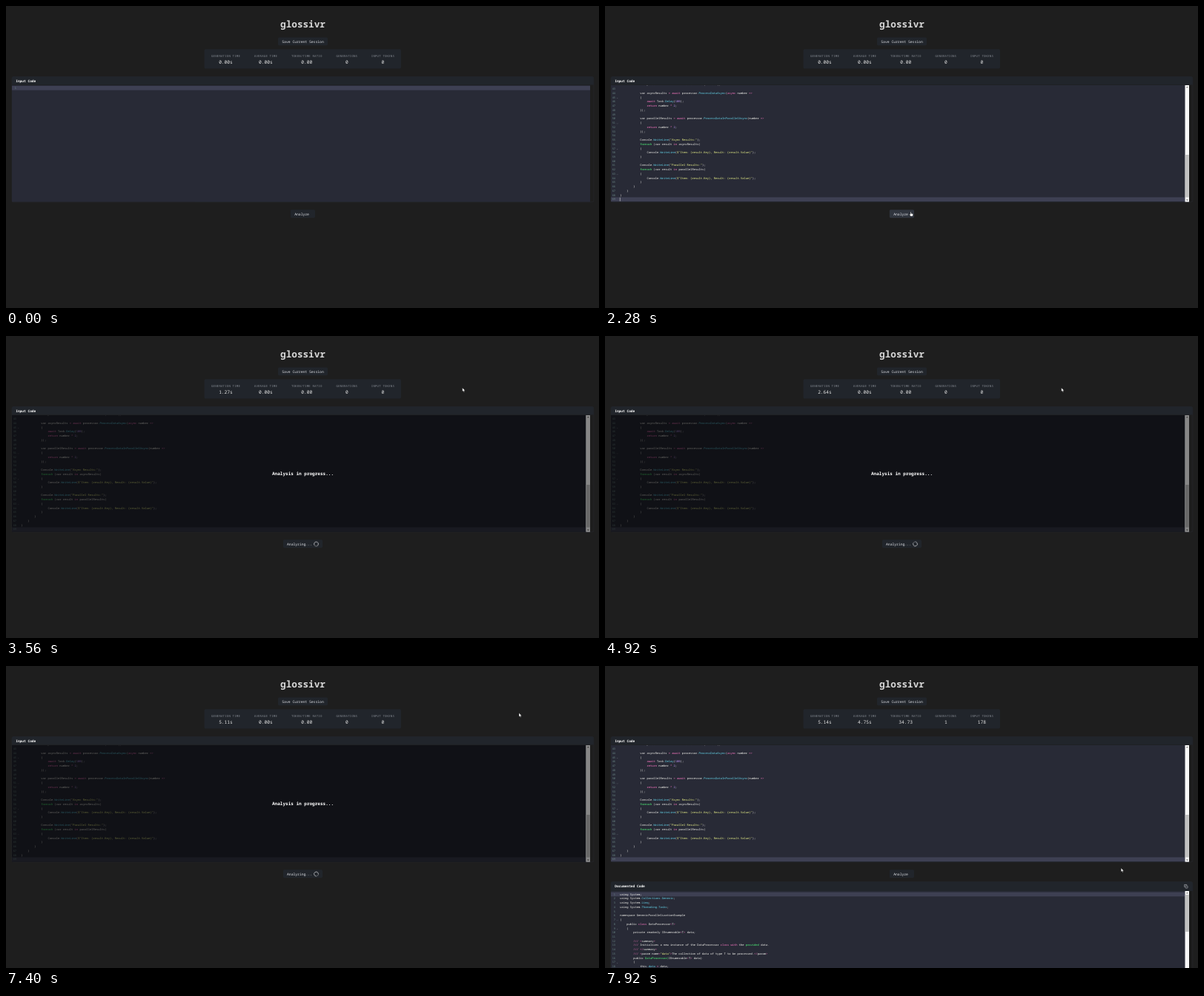
An HTML page that plays this animation: 800x408 px, repeating every 8000 ms.

```html
<!DOCTYPE html>
<html lang="en">
<head>
<meta charset="utf-8">
<title>glossivr</title>
<style>
html, body { margin: 0; width: 100%; height: 100%; overflow: hidden; background: #1e1e1e; }
svg { display: block; width: 100vw; height: 100vh; }
text { font-family: "Noto Sans Mono", "DejaVu Sans Mono", monospace; white-space: pre; text-rendering: geometricPrecision; }
.mid { text-anchor: middle; }
.code { font-size: 3.77px; font-weight: 500; fill: #f8f8f2; }
.num { font-size: 3.6px; fill: #6d8a88; text-anchor: end; }
.head { font-size: 4.52px; font-weight: 700; fill: #fff; }
.btn { font-size: 4.72px; font-weight: 500; fill: #e4e6ea; }
.label { font-size: 4px; letter-spacing: .2px; fill: #858a92; }
.value { font-size: 6.25px; font-weight: 500; fill: #e6e6e6; }
</style>
</head>
<body>
<svg id="stage" viewBox="0 0 800 408">
  <defs>
    <clipPath id="inClip"><rect x="8" y="107" width="780" height="157.5"/></clipPath>
    <clipPath id="outClip"><rect x="8" y="304" width="780" height="104"/></clipPath>
  </defs>
  <rect width="800" height="408" fill="#1e1e1e"/>
  <text class="mid" x="400.5" y="29" font-size="12.7" font-weight="700" fill="#d6d6d6">glossivr</text>
  <rect x="367" y="42.5" width="67" height="10.7" rx="1.6" fill="#21252b"/>
  <text class="btn mid" x="400.5" y="49.5">Save Current Session</text>
  <rect x="267.5" y="58.2" width="265.5" height="26.4" rx="2.2" fill="#21252b"/>
  <g id="stats"></g>

  <rect x="8" y="95.5" width="784.8" height="169.3" rx="2" fill="#1e1e1e" stroke="#292d33" stroke-width=".5"/>
  <path d="M8 106.5V97.5q0-2 2-2H790.8q2 0 2 2V106.5z" fill="#21252b"/>
  <text class="head" x="13.2" y="102.6">Input Code</text>
  <rect x="8" y="107" width="780" height="157.6" fill="#282a36"/>
  <g id="blank">
    <rect x="8" y="108" width="780" height="5.7" fill="#44475a" opacity=".8"/>
    <text class="num" x="14" y="112.2">1</text>
  </g>
  <g id="pasted">
    <g id="inCode" clip-path="url(#inClip)"></g>
    <rect id="dim" x="8" y="107" width="774.5" height="157.6" opacity=".6"/>
    <g id="inBar"></g>
  </g>
  <rect id="caret" x="19.9" width=".5" height="5" fill="#f8f8f2"/>
  <text id="busy" class="mid" x="400.5" y="188" font-size="6.02" font-weight="700" fill="#fff">Analysis in progress...</text>

  <rect id="btn" y="275.2" height="11" rx="1.6"/>
  <text id="btnText" class="btn" y="282.5"></text>
  <g id="spin" fill="none" stroke-width=".8">
    <circle r="2.9" stroke="#b4b7bb"/>
    <path d="M-2.05-2.05A2.9 2.9 0 0 1 2.05-2.05" stroke="#3a3e44"/>
  </g>

  <g id="result">
    <rect x="8" y="291.5" width="784.8" height="130" rx="2" fill="#1c1c1c" stroke="#292d33" stroke-width=".5"/>
    <path d="M8 304V293.5q0-2 2-2H790.8q2 0 2 2V304z" fill="#21252b"/>
    <text class="head" x="13.2" y="299.4">Documented Code</text>
    <g fill="none" stroke="#cfd2d6" stroke-width=".55">
      <rect x="783" y="297" width="3" height="3" rx=".5"/>
      <path d="M782.3 298.4h-.6v-3h3v.8"/>
    </g>
    <g id="output">
      <rect x="8" y="304" width="780" height="104" fill="#282a36"/>
      <g id="outCode" clip-path="url(#outClip)"></g>
      <g id="outBar"></g>
    </g>
  </g>

  <g id="cursor">
    <path id="arrow" d="M0 0V5L1.2 4L2 5.8L2.9 5.4L2.1 3.7H3.7z" fill="#fff" stroke="#000" stroke-width=".3"/>
    <path id="beam" d="M-.9-2.8H.9M0-2.8V2.8M-.9 2.8H.9" fill="none" stroke="#d8d8d8" stroke-width=".5"/>
    <path id="hand" d="M0 0h.9v2.2l2.6.5v2l-.7 1.4H.2L-1.4 3.6l.6-.5.8.6z" fill="#fff" stroke="#000" stroke-width=".3"/>
    <g id="stop" transform="translate(2 1.4)" fill="none">
      <circle r="1.9" stroke="#fff" stroke-width="1.2"/>
      <path d="M-1.3-1.3L1.3 1.3" stroke="#fff" stroke-width="1.1"/>
      <circle r="1.9" stroke="#c4476f" stroke-width=".7"/>
      <path d="M-1.3-1.3L1.3 1.3" stroke="#c4476f" stroke-width=".7"/>
    </g>
  </g>
</svg>
<script>
const $ = id => document.getElementById(id);
const show = (id, on) => $(id).setAttribute('display', on ? 'inline' : 'none');
const attrs = (node, map) => { for (const k in map) node.setAttribute(k, map[k]); return node; };
const add = (parent, tag, map, text) => {
  const node = attrs(document.createElementNS('http://www.w3.org/2000/svg', tag), map);
  if (text !== undefined) node.textContent = text;
  return parent.appendChild(node);
};

const LOOP = 8000, PITCH = 5.74, CHAR = 2.262;
const PASTE = 720, START = 2300, DONE = 7480, FILLED = 7600;

const inputLines = `            var processor = new DataProcessor<int>(numbers);

            var asyncResults = await processor.ProcessDataAsync(async number =>
            {
                await Task.Delay(100);
                return number * 2;
            });

            var parallelResults = await processor.ProcessDataInParallelAsync(number =>
            {
                return number * 2;
            });

            Console.WriteLine("Async Results:");
            foreach (var result in asyncResults)
            {
                Console.WriteLine($"Item: {result.Key}, Result: {result.Value}");
            }

            Console.WriteLine("Parallel Results:");
            foreach (var result in parallelResults)
            {
                Console.WriteLine($"Item: {result.Key}, Result: {result.Value}");
            }
        }
    }
}
`.split('\n');

const outputLines = `using System;
using System.Collections.Generic;
using System.Linq;
using System.Threading.Tasks;

namespace GenericParallelizationExample
{
    public class DataProcessor<T>
    {
        private readonly IEnumerable<T> data;

        /// <summary>
        /// Initializes a new instance of the DataProcessor class with the provided data.
        /// </summary>
        /// <param name="data">The collection of data of type T to be processed.</param>
        public DataProcessor(IEnumerable<T> data)
        {
            this.data = data;`.split('\n');

function colour(word) {
  if (/^\$?"/.test(word)) return '#f1fa8c';
  if (/^\.\w/.test(word)) return '#66d9ef';
  if (/^\d/.test(word)) return '#bd93f9';
  if (/^(await|async|return|in|class|with)$/.test(word) || /^[=<>*\/]+$/.test(word)) return '#ff79c6';
  if (/^(foreach|provided|DataProcessor\()$/.test(word)) return '#50fa7b';
  return '#f8f8f2';
}

function drawCode(group, lines, first, y, active) {
  add(group, 'rect', { x: 8, y: y + PITCH * (active - first) - 2.8, width: 774.5, height: 5.7, fill: '#44475a', opacity: .8 });
  lines.forEach((line, i) => {
    const mid = y + i * PITCH, code = line.trimStart();
    add(group, 'text', { class: 'num', x: 14, y: mid + 1.2 }, first + i);
    if (code === '{') add(group, 'path', { d: `M16 ${mid + .7}l.6.6.6-.6`, stroke: '#8b8f9c', 'stroke-width': .4, fill: 'none' });
    const text = add(group, 'text', { class: 'code', x: 20.2 + CHAR * (line.length - code.length), y: mid + 1.2 });
    const parts = code.match(/\$?"[^"]*"|\.\w+|DataProcessor\(|\w+|[=<>*\/]+|\s+|./g) || [];
    parts.forEach(p => add(text, 'tspan', { fill: colour(p) }, p));
  });
}

function drawBar(group, top, bottom, from, to) {
  add(group, 'rect', { x: 782.5, y: top, width: 5.5, height: bottom - top, fill: '#f8f8f8' });
  add(group, 'rect', { x: 782.8, y: from, width: 4.9, height: to - from, fill: '#c1c1c1' });
  add(group, 'path', { d: `M784.1 ${top + 3.2}l1.2-1.5 1.2 1.5z`, fill: '#444' });
  add(group, 'path', { d: `M784.1 ${bottom - 3.2}l1.2 1.5 1.2-1.5z`, fill: '#444' });
}

drawCode($('inCode'), inputLines, 42, 261.2 - 27 * PITCH, 69);
drawCode($('outCode'), outputLines, 1, 308.4, 1);
drawBar($('inBar'), 107, 264.6, 201, 258.5);
drawBar($('outBar'), 304, 416, 309, 359);
add($('inBar'), 'rect', { id: 'barDim', x: 782.5, y: 107, width: 5.5, height: 157.6, opacity: .46 });

const values = [
  ['GENERATION TIME', 296.5], ['AVERAGE TIME', 350.4], ['TOKEN/TIME RATIO', 405.7],
  ['GENERATIONS', 459.9], ['INPUT TOKENS', 508.4]
].map(([name, x]) => {
  add($('stats'), 'text', { class: 'label mid', x, y: 68.9 }, name);
  return add($('stats'), 'text', { class: 'value mid', x, y: 77.5 });
});

// Each key holds a time followed by the values at that time.
function track(keys, t) {
  const i = keys.findIndex(k => k[0] > t);
  if (i === 0) return keys[0].slice(1);
  if (i < 0) return keys[keys.length - 1].slice(1);
  const a = keys[i - 1], b = keys[i], p = (t - a[0]) / (b[0] - a[0]), e = p * p * (3 - 2 * p);
  return a.slice(1).map((v, n) => v + (b[n + 1] - v) * (b.length > 2 ? e : p));
}

const path = [
  [400, 158.7, 178.5], [1240, 158.7, 178.5], [1280, 292, 186.4], [1360, 329.5, 189.6],
  [1520, 329.5, 189.6], [2040, 408, 279], [2280, 412, 278], [2360, 412, 278],
  [3120, 615.7, 70], [6800, 615.7, 70], [7400, 692, 63.5], [7520, 707.7, 97.5],
  [7720, 696.6, 273.4], [7880, 696.6, 273.4], [7920, 696.2, 273]
];
const clock = [[2290, 0], [2320, .03], [4920, 2.64], [6400, 4.11], [7400, 5.11]];

function render(t) {
  const busy = t >= START && t < DONE, done = t >= DONE;
  const secs = done ? 5.14 : track(clock, t)[0];
  const texts = done ? ['4.75s', '34.73', '1', '178'] : ['0.00s', '0.00', '0', '0'];
  [secs.toFixed(2) + 's', ...texts].forEach((s, i) => { values[i].textContent = s; });

  show('blank', t < PASTE);
  show('pasted', t >= PASTE);
  show('dim', busy);
  show('barDim', busy);
  show('busy', busy);
  show('caret', t >= 480 && t < START);
  attrs($('caret'), { y: t < PASTE ? 108.3 : 258.7 });

  const [x, y] = track(path, t);
  const left = busy ? 374 : 383.8, right = busy ? 427 : 417;
  const over = x > left && x < right && y > 274 && y < 286;
  attrs($('btn'), { x: left, width: right - left, fill: over ? '#30353e' : '#21252b' });
  attrs($('btnText'), { x: busy ? 379 : 389.2 });
  $('btnText').textContent = busy ? 'Analyzing...' : 'Analyze';
  show('spin', busy);
  attrs($('spin'), { transform: `translate(418.5 281) rotate(${t * .36 % 360})` });

  show('result', done);
  show('output', t >= FILLED);

  show('cursor', t >= 400);
  attrs($('cursor'), { transform: `translate(${x} ${y})` });
  const beam = t < START && y < 265;
  show('beam', beam);
  show('hand', over && !busy);
  show('stop', over && busy);
  show('arrow', !beam && !over);
}

function frame(now) {
  render(Math.floor(now % LOOP / 40) * 40);
  requestAnimationFrame(frame);
}
render(0);
requestAnimationFrame(frame);
</script>
</body>
</html>
```
